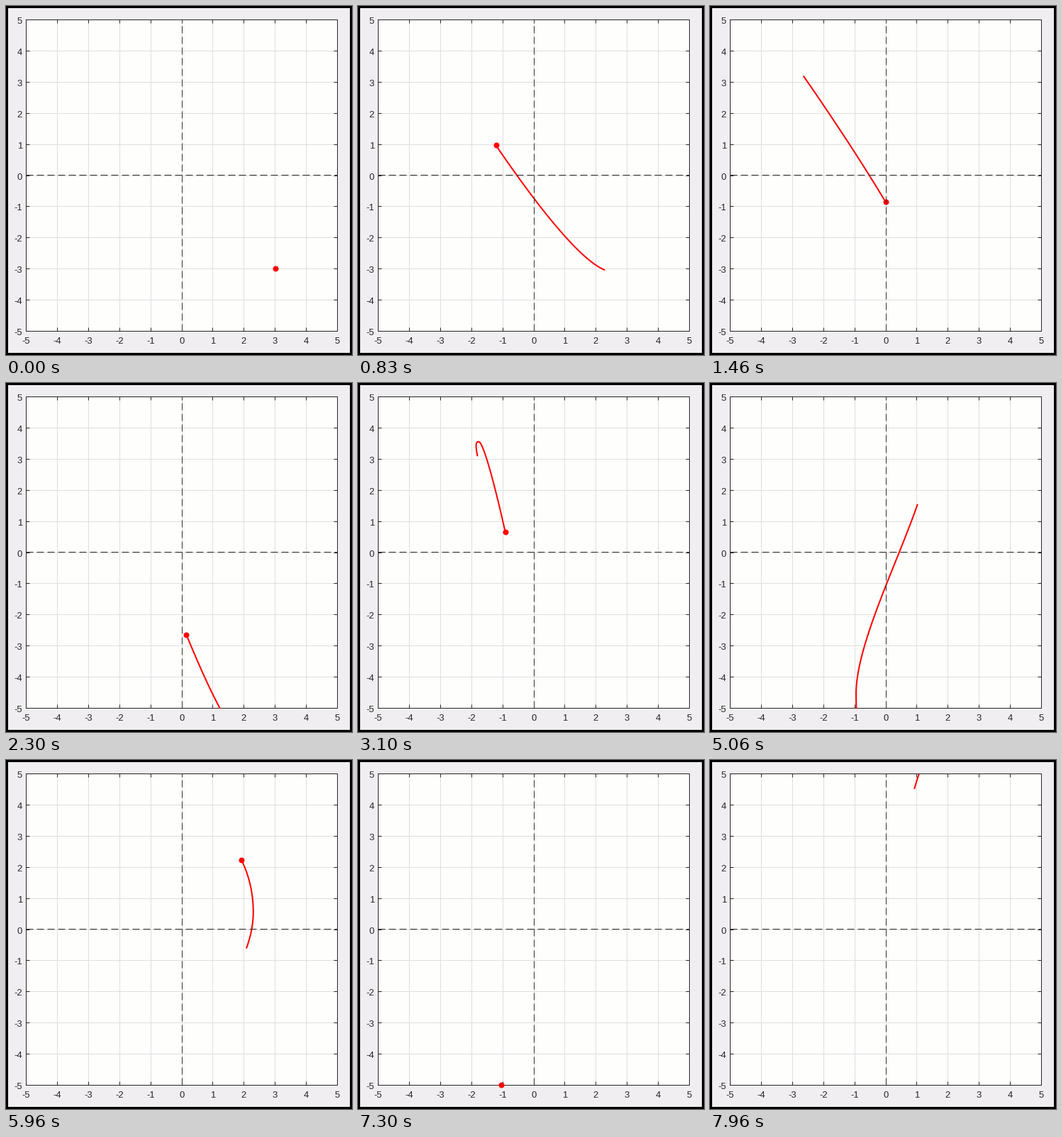
These frames come from a looping animation (488x492 px, 8 s). A matplotlib script:

```python
import numpy as np
import matplotlib.pyplot as plt
from matplotlib.animation import FuncAnimation
from matplotlib.patches import Rectangle

WIDTH, HEIGHT = 488, 492
STEP_MS, LOOP_MS = 20, 8000
FPS = 30
START, TRAIL = 9, 10            # first motion step, trail length in steps
LEFT, RIGHT, TOP, BOTTOM = 28.5, 467.5, 19.5, 458.5
CX, CY, UNIT = 247.8, 238.5, 43.9
INK = "#262626"


def swing(*keys):
    """Smooth curve through (step, value) keys that rests at each turning point."""
    t, v = np.array(keys, float).T
    rise = np.diff(v) / np.diff(t)
    slope = np.gradient(v, t)
    slope[1:-1][rise[:-1] * rise[1:] <= 0] = 0
    slope[0] = 0

    def value(s):
        i = np.clip(np.searchsorted(t, s, side="right") - 1, 0, len(t) - 2)
        h = t[i + 1] - t[i]
        u = np.clip((s - t[i]) / h, 0, 1)
        return (v[i] + (v[i + 1] - v[i]) * u * u * (3 - 2 * u)
                + h * u * (1 - u) * (slope[i] * (1 - u) - slope[i + 1] * u))

    return value


x_at = swing((9, 3), (31.8, -2.78), (53.8, 2), (85, -1.85), (102.5, 0.3),
             (117, -1.89), (140, 1.39), (148, -0.95), (173, 2.3), (179, 1.92),
             (190.5, -0.82), (204, 0.25), (219, -1.05), (229, 0.92), (239, 2.1))
y_at = swing((9, -3), (13, -3.1), (31.8, 3.38), (57.5, -5.8), (87, 3.55),
             (103.3, -5.9), (137.8, 3.85), (151, -5.8), (169, -0.62),
             (179, 2.22), (189, 4.34), (206.5, -7.5), (219, -4.99),
             (229, 4.5), (239, 6.2))


def pixels(steps):
    return CX + UNIT * x_at(steps), CY - UNIT * y_at(steps)


fig = plt.figure(figsize=(WIDTH / 72, HEIGHT / 72), dpi=72, facecolor="#f0eef0")
ax = fig.add_axes([0, 0, 1, 1])
ax.set_xlim(0, WIDTH)
ax.set_ylim(HEIGHT, 0)
ax.axis("off")


def rect(x, y, w, h, color):
    patch = Rectangle((x, y), w, h, facecolor=color, edgecolor="none", zorder=0)
    return ax.add_patch(patch)


def line(x0, y0, x1, y1, color, z, **style):
    ax.plot([x0, x1], [y0, y1], color=color, lw=1, zorder=z, snap=False,
            solid_capstyle="butt", **style)


def label(x, y, value, align):
    ax.text(x, y, str(value), ha=align, va="center_baseline", color=INK,
            fontsize=13, family="Liberation Sans", zorder=3)


# Window border and plot area
for x in (0, WIDTH - 3):
    rect(x, 0, 3, HEIGHT, "black")
for y in (0, HEIGHT - 3):
    rect(0, y, WIDTH, 3, "black")
area = rect(LEFT, TOP, RIGHT - LEFT, BOTTOM - TOP, "#fefefd")

for n in range(-5, 6):
    gx = np.floor(LEFT + UNIT * (n + 5)) + 0.5
    gy = np.floor(BOTTOM - UNIT * (n + 5)) + 0.5
    if abs(n) < 5:
        line(gx, TOP, gx, BOTTOM, "#dedede", 1)
        line(LEFT, gy, RIGHT, gy, "#dedede", 1)
        for edge, inward in ((TOP, 5), (BOTTOM, -5)):
            line(gx, edge, gx, edge + inward, INK, 2)
        for edge, inward in ((LEFT, 5), (RIGHT, -5)):
            line(edge, gy, edge + inward, gy, INK, 2)
    label(gx, 471.5, n, "center")
    label(23, gy + 1, n, "right")

for x in (LEFT, RIGHT):
    line(x, TOP - 0.5, x, BOTTOM + 0.5, INK, 2)
for y in (TOP, BOTTOM):
    line(LEFT - 0.5, y, RIGHT + 0.5, y, INK, 2)

dashes = dict(dashes=(10, 5), dash_capstyle="butt")
line(LEFT, 238.5, RIGHT, 238.5, "#303030", 6, **dashes)
line(248.5, BOTTOM, 248.5, TOP, "#303030", 6, **dashes)

trail, = ax.plot([], [], color="red", lw=2, zorder=4, solid_capstyle="butt")
trail.set_clip_path(area)
dot, = ax.plot([], [], "o", color="red", ms=8, mew=0, zorder=5)


def update(frame):
    step = int((frame * STEP_MS + 9) * FPS / 1000)
    now = max(step, START)
    trail.set_data(*pixels(np.linspace(max(now - TRAIL, START), now, 81)))
    dot.set_data(*pixels(np.array([now])))
    dot.set_visible(bool(abs(y_at(now)) <= 5))
    return trail, dot


anim = FuncAnimation(fig, update, frames=LOOP_MS // STEP_MS, interval=STEP_MS,
                     repeat=True, repeat_delay=0)
plt.show()
```
